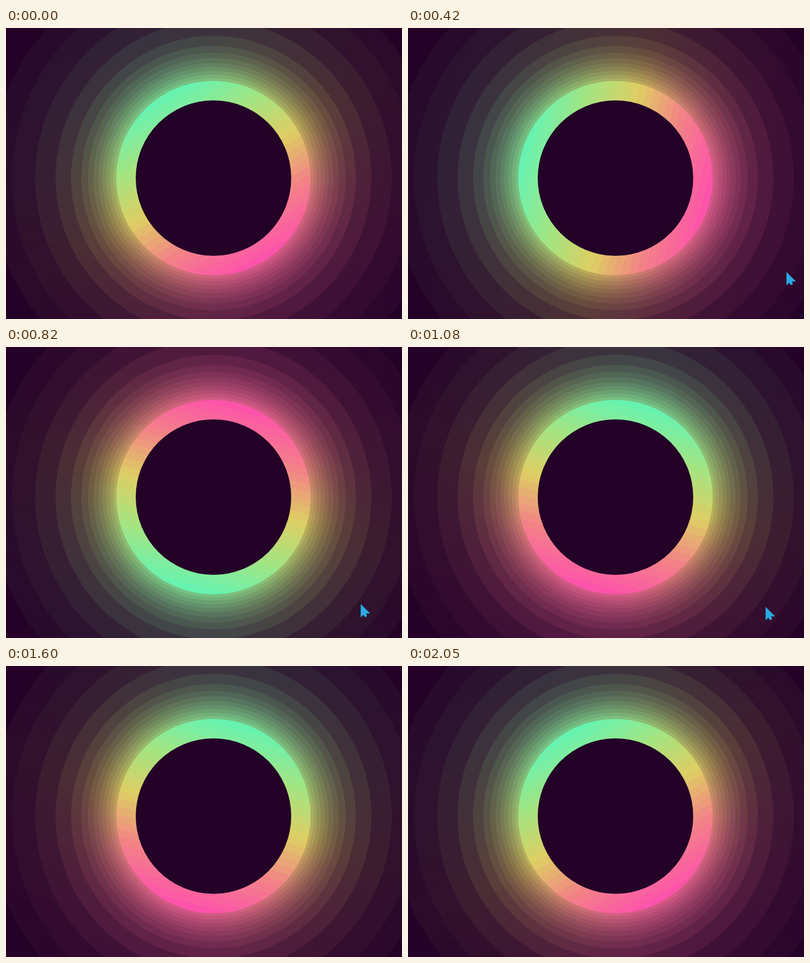
Recreate the animation shown at these times as an HTML page. Size 815 by 599 pixels, loop 2.12 s.

```html
<!DOCTYPE html>
<html lang="en">
<head>
<meta charset="utf-8">
<title>Glowing ring loader</title>
<style>
  html, body { margin: 0; width: 100%; height: 100%; overflow: hidden; background: #240228; }
  svg { display: block; width: 815px; height: 599px; }
</style>
</head>
<body>
<svg viewBox="0 0 815 599">
  <defs></defs>
  <rect width="815" height="599" fill="#240228"/>
  <g transform="translate(427 309)">
    <g id="spinner"></g>
    <circle r="160" fill="#240228"/>
  </g>
  <path id="pointer" d="M0 0V27.5L5.8 22L8.5 27L13 25.5L11.5 19.5H19.5Z" fill="#2baae2"/>
</svg>
<script>
const LOOP = 2120;
const RING_RADIUS = 200;
const PALETTE = [[104, 242, 176], [166, 228, 128], [222, 206, 99], [243, 132, 134], [252, 84, 170]];
const BAND_RADII = [460, 415, 367, 325, 293, 272, 258, 247, 237, 229, 221, 213, 206, 200];
const SVG_NS = "http://www.w3.org/2000/svg";
const defs = document.querySelector("defs");
const spinner = document.getElementById("spinner");
const pointer = document.getElementById("pointer");

const mix = (a, b, t) => a + (b - a) * t;

function add(parent, tag, attributes) {
  const node = document.createElementNS(SVG_NS, tag);
  for (const name in attributes) node.setAttribute(name, attributes[name]);
  return parent.appendChild(node);
}

function paletteColor(t) {
  const x = t * (PALETTE.length - 1);
  const i = Math.min(Math.floor(x), PALETTE.length - 2);
  return `rgb(${PALETTE[i].map((c, k) => Math.round(mix(c, PALETTE[i + 1][k], x - i)))})`;
}

function addGradient(id, extent, steps) {
  const gradient = add(defs, "linearGradient", {
    id, gradientUnits: "userSpaceOnUse", x1: 0, x2: 0, y1: -extent, y2: extent
  });
  for (let i = 0; i < steps; i++) {
    const color = paletteColor(i / (steps - 1));
    add(gradient, "stop", { offset: i / steps, "stop-color": color });
    add(gradient, "stop", { offset: (i + 1) / steps, "stop-color": color });
  }
}

function addDisc(id, radius, extent, opacity, steps) {
  addGradient(id, extent, steps);
  add(spinner, "circle", { r: radius, fill: `url(#${id})`, "fill-opacity": opacity });
}

// Each disc adds just enough to reach the glow strength of its band.
const glowAt = radius => 0.85 * Math.exp((RING_RADIUS - radius) / 77);
let covered = 0;
BAND_RADII.slice(0, -1).forEach((radius, i) => {
  const strength = glowAt((radius + BAND_RADII[i + 1]) / 2);
  addDisc(`glow${i}`, radius, radius * 1.2, 1 - (1 - strength) / (1 - covered), 40);
  covered = strength;
});
addDisc("ring", RING_RADIUS, RING_RADIUS, 1, 26);

// Start time of every step, in ms.
const stepStarts = [0, 50, 110];
while (stepStarts.length < 33) {
  const previous = stepStarts.length - 1;
  stepStarts.push(stepStarts[previous] + (previous % 4 === 2 ? 50 : 70));
}

// Pointer path: step, x, y.
const pointerPath = [
  [1, 800, 599], [2, 778, 562], [3, 761, 526], [4, 752, 500], [6, 762, 498],
  [9, 813, 511], [10, 810, 515], [13, 730, 529], [17, 736, 535],
  [21, 757, 545], [22, 768, 562], [23, 778, 599]
];

function pointerAt(step) {
  const next = pointerPath.findIndex(point => point[0] >= step);
  if (next < 0 || step < pointerPath[0][0]) return [900, 700];
  const to = pointerPath[next];
  const from = pointerPath[Math.max(next - 1, 0)];
  const t = (step - from[0]) / (to[0] - from[0] || 1);
  return [mix(from[1], to[1], t), mix(from[2], to[2], t)];
}

function draw(time) {
  const step = stepStarts.findLastIndex(start => start <= time);
  spinner.setAttribute("transform", `rotate(${45 * step - 30})`);
  pointer.setAttribute("transform", `translate(${pointerAt(step)})`);
}

const startTime = performance.now();
function tick() {
  draw((performance.now() - startTime) % LOOP);
  requestAnimationFrame(tick);
}
tick();
</script>
</body>
</html>
```
